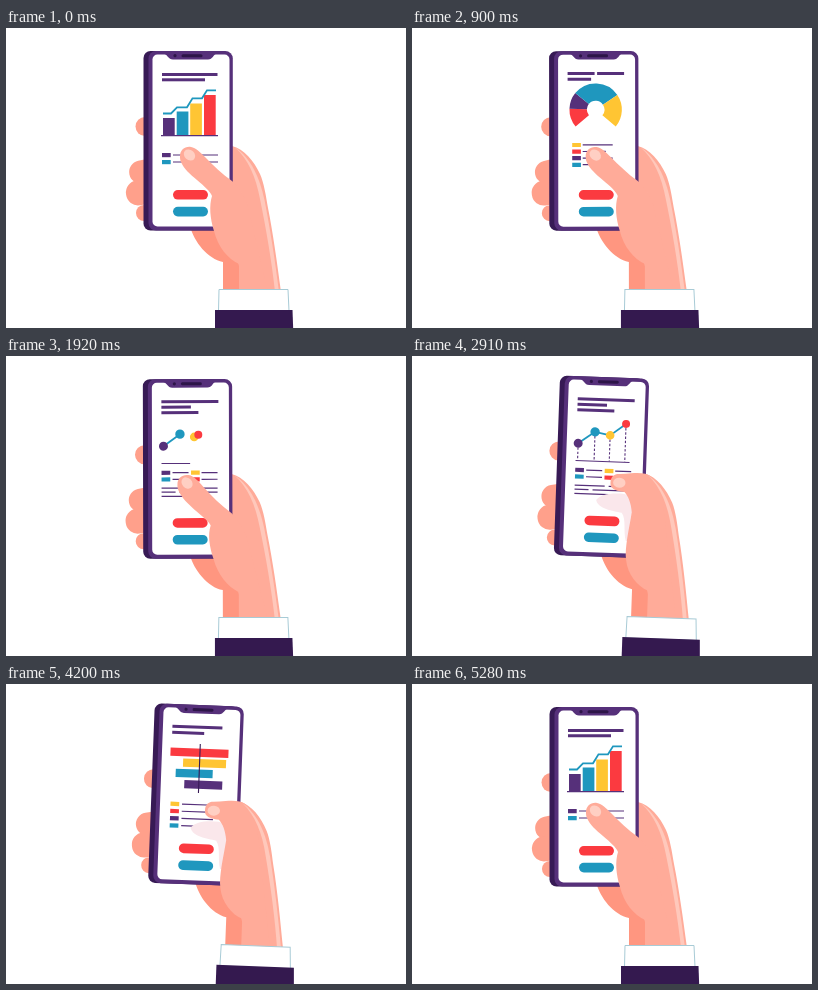
Write an HTML page that moves like this. It is 400x300 px and loops after 5310 ms.

```html
<!DOCTYPE html>
<html lang="en">
<head>
<meta charset="utf-8">
<title>Phone charts</title>
<style>
html, body { margin: 0; width: 100%; height: 100%; overflow: hidden; background: #fff; }
svg { display: block; width: 100vw; height: 100vh; }
</style>
</head>
<body>
<svg viewBox="0 0 400 300">
  <defs>
    <clipPath id="glass"><rect x="146.5" y="26.5" width="77" height="172" rx="5"/></clipPath>
  </defs>
  <g id="arm">
    <!-- back of the hand -->
    <g fill="#ffa08b">
      <rect x="129.5" y="89" width="24" height="19" rx="9.5"/>
      <rect x="123" y="132" width="28" height="23" rx="11.5" transform="rotate(-12 137 143)"/>
      <rect x="120" y="152" width="30" height="25" rx="12" transform="rotate(-8 135 165)"/>
      <rect x="130" y="177" width="24" height="16" rx="8"/>
    </g>
    <path fill="#ff9680" d="M184 198C188 214 202 231 217 234V264H242V198Z"/>
    <path fill="#ffab99" d="M220 116L226 118C238 121 248 133 254 146C258 155 260 168 262 180C267 205 271 234 275 264H240L220 190Z"/>
    <!-- phone -->
    <rect x="137.5" y="23" width="84" height="179.5" rx="7" fill="#371a55"/>
    <rect x="142.5" y="23" width="84.3" height="179.5" rx="7.5" fill="#56307a"/>
    <rect x="146.5" y="26.5" width="77" height="172" rx="5" fill="#fff"/>
    <g clip-path="url(#glass)">
      <g id="old"></g>
      <g id="new"></g>
      <rect x="167" y="162" width="35" height="9.6" rx="4.8" fill="#fb3a40"/>
      <rect x="167" y="178.8" width="35" height="9.6" rx="4.8" fill="#1f97be"/>
    </g>
    <path fill="#56307a" d="M157 25.5H211C207 26.5 207 31.5 202 31.5H167C162 31.5 162 26.5 157 25.5Z"/>
    <rect x="175.5" y="26.2" width="21" height="3" rx="1.5" fill="#2d1548"/>
    <circle cx="169" cy="27.7" r="1.6" fill="#2d1548"/>
    <path id="shade" fill="#fae7eb" d="M178 146C182 140 194 138 206 139L215 142V186H209C206 176 209 165 204 158C195 156 180 155 178 146Z"/>
    <!-- thumb and palm -->
    <path id="thumb" fill="#ffab99"/>
    <ellipse id="nail" rx="6.2" ry="5" fill="#ffcfc3"/>
    <path fill="#ffc8bb" d="M229 119.5C242 131 250 149 254 171C260 200 266 235 269 264H273C269 232 264 200 258.5 172C254 150 245 130 229 119.5Z"/>
    <!-- sleeve -->
    <path fill="#fff" stroke="#a8cbd6" d="M213 261.5H282L283 283H212.5Z"/>
    <path fill="#34194f" d="M209 282H286.5L287.5 310H209Z"/>
  </g>
</svg>
<script>
const LOOP = 5310, STEP = LOOP / 4;
const PURPLE = '#56307a', TEAL = '#1f97be', YELLOW = '#ffc533', RED = '#fb3a40';
const $ = id => document.getElementById(id);
const mix = (a, b, k) => a + (b - a) * k;
const span = (t, a, b) => Math.min(1, Math.max(0, (t - a) / (b - a)));
const ease = (t, a, b) => (1 - Math.cos(Math.PI * span(t, a, b))) / 2;

const box = (x, y, w, h, c = PURPLE) => `<rect x="${x}" y="${y}" width="${w}" height="${h}" fill="${c}"/>`;
const line = (x1, y1, x2, y2, c = PURPLE, w = 1, extra = '') =>
  `<line x1="${x1}" y1="${y1}" x2="${x2}" y2="${y2}" stroke="${c}" stroke-width="${w}" ${extra}/>`;
const title = (x1, x2, y) => box(x1, y, x2 - x1, 3);
const rule = (x1, x2, y) => line(x1, y, x2, y, PURPLE, 1.2);
const key = (x, y, c, x1, x2) => box(x, y - 2, 8.7, 4.2, c) + rule(x1, x2, y);

function bars(b) {
  let s = title(156, 211.5, 45) + title(156, 199, 50.3);
  [[157, 90, PURPLE], [170.7, 83.5, TEAL], [184.2, 75.5, YELLOW], [198, 67, RED]].forEach(([x, y, c], i) => {
    const h = (107.5 - y) * ease(b, i * .12, .5 + i * .12);
    s += box(x, 107.5 - h, 11.7, h, c);
  });
  const drawn = 100 * ease(b, .3, 1);
  s += `<path d="M157 85.5H165L171 79.3H181L186.5 70.3H196L201 62.3H210" fill="none" stroke="${TEAL}"
    stroke-width="1.8" pathLength="100" stroke-dasharray="${drawn} 200"/>`;
  return s + rule(155, mix(155, 212, ease(b, 0, .6)), 107.6)
    + key(156, 127, PURPLE, 167, 212) + key(156, 134, TEAL, 167, 212);
}

function donut(b) {
  const end = mix(140, 400, ease(b, 0, .95));
  const at = deg => {
    const a = deg * Math.PI / 180;
    return `${184 + 17.5 * Math.cos(a)} ${81.5 + 17.5 * Math.sin(a)}`;
  };
  let s = title(156, 183, 44) + title(185.5, 212.5, 44) + title(156, 179.5, 49.7);
  [[140, 182, RED], [182, 219, PURPLE], [219, 326, TEAL], [326, 400, YELLOW]].forEach(([a, z, c]) => {
    const stop = Math.min(z, end);
    if (stop > a) s += `<path d="M${at(a)}A17.5 17.5 0 0 1 ${at(stop)}" fill="none" stroke="${c}" stroke-width="17.4"/>`;
  });
  [YELLOW, RED, PURPLE, TEAL].forEach((c, i) => {
    s += key(160.5, 116.8 + i * 6.6, c, 171, i === 1 ? 194 : 201);
  });
  return s;
}

function trend(b) {
  const pts = [[158, 90, PURPLE, 4.5], [174.5, 78, TEAL, 4.7], [189.7, 81, YELLOW, 4.3], [205.2, 69, RED, 4]];
  const move = [[0, .1], [.05, .25], [.18, .43], [.3, .6]];
  const link = [[.05, .25], [.4, .6], [.58, .78]];
  let s = title(156, 213, 44) + title(156, 185.5, 49.5) + title(156, 193, 55);
  pts.forEach(([x, y], i) => {
    const k = ease(b, .6 + i * .05, .85 + i * .05);
    if (k) s += line(x, y, x, mix(y, 107, k), PURPLE, 1.1, 'stroke-dasharray="2.4 1.8"');
  });
  link.forEach(([a, z], i) => {
    const k = ease(b, a, z), [x, y] = pts[i], [x2, y2] = pts[i + 1];
    if (k) s += line(x, y, mix(x, x2, k), mix(y, y2, k), TEAL, 1.8);
  });
  pts.forEach(([x, y, c, r], i) => {
    const [a, z] = move[i], k = ease(b, a, z), [px, py] = pts[Math.max(0, i - 1)];
    if (k) s += `<circle cx="${mix(px, x, k)}" cy="${mix(py, y, k)}" r="${r * Math.min(1, k * 5)}" fill="${c}"/>`;
  });
  s += line(156, 107.4, mix(156, 210, ease(b, 0, .75)), 107.4);
  s += key(156, 116.5, PURPLE, 167, 183) + key(185.5, 116.5, YELLOW, 196, 212)
    + key(156, 123.2, TEAL, 167, 183) + key(185.5, 123.2, RED, 196, 212);
  return s + rule(156, 186, 132) + rule(190, 212, 132) + rule(156, 170, 136) + rule(174, 212, 136) + rule(156, 190, 140.2);
}

function ranges(b) {
  const mid = 184.5;
  let s = title(156, 206, 43.7) + title(156, 188, 49.7);
  [[155, 213, 66.5, RED], [168, 211, 77, YELLOW], [161, 198, 87.5, TEAL], [170, 208, 98.5, PURPLE]].forEach(([x, x2, y, c], i) => {
    const k = ease(b, .1 + i * .12, .6 + i * .12);
    s += box(mix(mid, x, k), y, (x2 - x) * k, 8.3, c);
  });
  s += line(mid, 62, mid, mix(62, 111, ease(b, 0, .5)), '#371a55', 1.1);
  [YELLOW, RED, PURPLE, TEAL].forEach((c, i) => { s += key(157, 122.6 + i * 7.2, c, 168.5, 200); });
  return s;
}

const screens = [bars, donut, trend, ranges];

// The two thumb poses share one path structure.
const reach = 'M174 128C174 122 179 118 185 119C190 120 194 124 199 129C207 137 216 146 226 153C232 158 237 166 241 175L262 264L233 264L233 236C222 231 212 219 208 203C204 190 203 178 206 168C204 163 198 158 191 152C184 146 178 141 175 134C174 132 174 130 174 128Z';
const rest = 'M191.7 128C191.7 122 195 119.3 200 119.2C204 119 208 118.5 212 118C217 117.5 222 117.2 226 118C233 119.5 238 125 243 133L262 264L233 264L233 235C222 231 212 219 210 205C208 192 212 174 214 157C213 148 210 141 206 137C201 136.5 196 136 193.2 133C192 132 191.7 130 191.7 128Z';
const restNums = rest.match(/[\d.]+/g).map(Number);
function thumbPath(k) {
  let i = 0;
  return reach.replace(/[\d.]+/g, n => mix(+n, restNums[i++], k).toFixed(2));
}

function draw(now) {
  const t = now % LOOP, n = Math.floor(t / STEP), p = t - n * STEP;

  const tilt = 2.2 * ease(p, 20, 190) - 2.33 * ease(p, 190, 560) + .13 * ease(p, 700, 1200);
  $('arm').setAttribute('transform', `rotate(${tilt} 240 320)`);

  const back = ease(p, 20, 200) - 1.12 * ease(p, 270, 500) + .12 * ease(p, 580, 850);
  $('thumb').setAttribute('d', thumbPath(back));
  $('nail').setAttribute('transform',
    `translate(${mix(183.5, 200.5, back)} ${mix(127, 128, back)}) rotate(${mix(42, 0, back)})`);
  $('shade').setAttribute('opacity', Math.max(0, back));

  const slide = 80 * ease(p, 290, 490);
  $('old').innerHTML = slide < 80 ? screens[n](1) : '';
  $('new').innerHTML = slide > 0 ? screens[(n + 1) % 4](span(p, 430, 850)) : '';
  $('old').setAttribute('transform', `translate(${-slide} 0)`);
  $('new').setAttribute('transform', `translate(${80 - slide} 0)`);
}

const start = performance.now();
function tick() {
  draw(performance.now() - start);
  requestAnimationFrame(tick);
}
tick();
</script>
</body>
</html>
```
